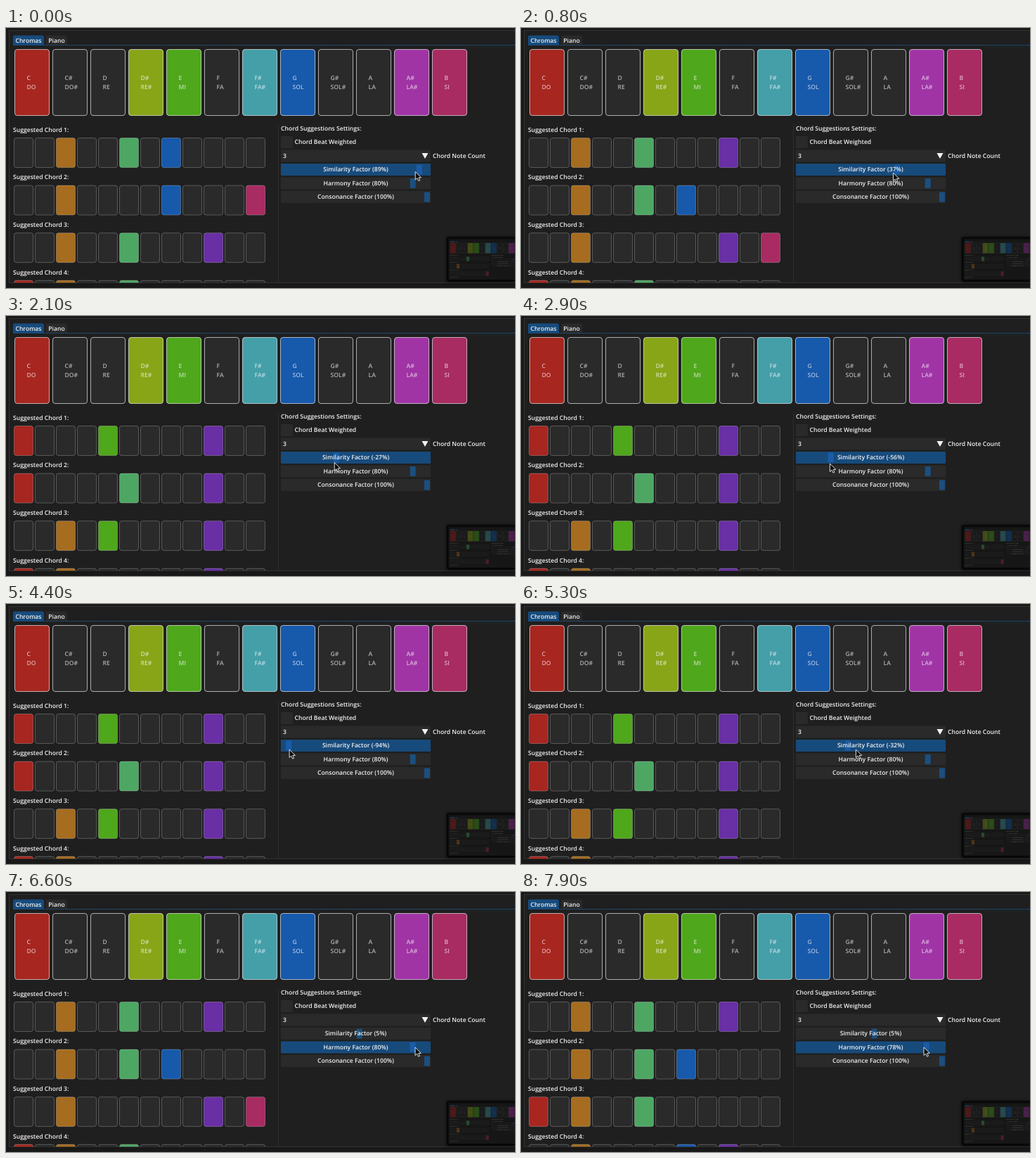
An HTML page that plays this animation: 724 px wide and 370 px high, repeating every 8 s.

```html
<!DOCTYPE html>
<html lang="en">
<head>
<meta charset="utf-8">
<title>Chord suggestions</title>
<style>
  html, body { margin: 0; width: 100%; height: 100%; overflow: hidden; background: #191919; }
  svg { display: block; width: 724px; height: 370px; }
  text {
    font: 600 8.6px "Open Sans", "Noto Sans", sans-serif;
    fill: #f2f2f2;
    text-rendering: geometricPrecision;
  }
  .note { fill: #fff; fill-opacity: .62; }
  .mid { text-anchor: middle; }
</style>
</head>
<body>
<svg id="stage" viewBox="0 0 724 370">
  <defs>
    <clipPath id="panel"><rect width="724" height="362.5"/></clipPath>
    <filter id="soft" x="-20%" y="-20%" width="140%" height="140%"><feGaussianBlur stdDeviation="2"/></filter>
  </defs>
</svg>
<script>
const LOOP = 8000, STEP = 100;
const WHITE = '#f2f2f2', DARK = '#2a2a2a', BLUE = '#174b7c', GRAB = '#1b4f80', GRAB_ON = '#1b5ca6';
const FRAME_H = 16.9, LINE_H = 19.5, SETTINGS_X = 391, SETTINGS_W = 213;

const NOTES = 'C DO,C# DO#,D RE,D# RE#,E MI,F FA,F# FA#,G SOL,G# SOL#,A LA,A# LA#,B SI'
  .split(',').map(s => s.split(' '));
const COLORS = ['#a72620', DARK, '#a66c1f', '#88a518', '#4fa71c', '#4da763',
  '#449fa8', '#1759ab', DARK, '#692fa5', '#a034a5', '#a82b62'];
const UNLIT = ['D', 'F', 'A'];

const el = (tag, attrs, parent, text) => {
  const node = document.createElementNS('http://www.w3.org/2000/svg', tag);
  for (const k in attrs) node.setAttribute(k, attrs[k]);
  if (text !== undefined) node.textContent = text;
  return parent.appendChild(node);
};
const box = (p, x, y, width, height, fill, extra) =>
  el('rect', { x, y, width, height, fill, ...extra }, p);
const path = (p, d, fill, extra) => el('path', { d, fill, ...extra }, p);
const label = (p, x, cy, text, cls = '') =>
  el('text', { x, y: cy + 3.2, class: cls }, p, text);

const midX = SETTINGS_X + SETTINGS_W / 2;
const grabX = value => midX + 1.015 * value;
const rowY = n => 154 + LINE_H * n;

function slider(p, n, name) {
  const y = rowY(n);
  const frame = box(p, SETTINGS_X, y, SETTINGS_W, FRAME_H, DARK, { rx: 1 });
  const grab = box(p, 0, y + 1.5, 8, FRAME_H - 3, GRAB, { rx: 1 });
  const text = label(p, midX, y + 8, '', 'mid');
  return (value, active) => {
    frame.setAttribute('fill', active ? BLUE : DARK);
    grab.setAttribute('fill', active ? GRAB_ON : GRAB);
    grab.setAttribute('x', grabX(value) - 4);
    text.textContent = `${name} Factor (${Math.round(value)}%)`;
  };
}

function tab(p, x, w, name, fill) {
  path(p, `M${x} 24.5V13q0-2.5 2.5-2.5h${w - 5}q2.5 0 2.5 2.5V24.5z`, fill);
  label(p, x + w / 2, 17.7, name, 'mid');
}

function buildUi(root) {
  box(root, 0, 0, 724, 370, '#191919');
  box(root, 4.5, 3.5, 730, 359, '#1f1f1f', { stroke: '#343434' });
  tab(root, 10, 44, 'Chromas', BLUE);
  tab(root, 57, 30, 'Piano', DARK);
  path(root, 'M10 24.5H724', 'none', { stroke: '#1a4670' });

  NOTES.forEach(([name, solfa], i) => {
    const x = 12.5 + 54 * i;
    box(root, x, 30.5, 49, 94, UNLIT.includes(name) ? DARK : COLORS[i],
      { rx: 3.5, stroke: '#fff', 'stroke-opacity': .62 });
    label(root, x + 17, 71, name, 'note');
    label(root, x + 17, 84, solfa, 'note');
  });

  path(root, 'M387.5 137V362', 'none', { stroke: '#2e2e2e' });

  const inner = el('g', { 'clip-path': 'url(#panel)' }, root);
  const rows = [0, 1, 2, 3].map(r => {
    const y = 67.6 * r;
    label(inner, 10, 144.5 + y, `Suggested Chord ${r + 1}:`);
    return NOTES.map((_, i) => box(inner, 11.5 + 30 * i, 156.5 + y, 27, 42, DARK,
      { rx: 3, stroke: '#fff', 'stroke-opacity': .24 }));
  });

  label(root, SETTINGS_X, 143, 'Chord Suggestions Settings:');
  box(root, SETTINGS_X, rowY(0), FRAME_H, FRAME_H, DARK, { rx: 1 });
  label(root, 410.5, rowY(0) + 8, 'Chord Beat Weighted');
  box(root, SETTINGS_X, rowY(1), SETTINGS_W, FRAME_H, DARK, { rx: 1 });
  label(root, 394, rowY(1) + 8.3, '3');
  path(root, 'M591.5 178h9l-4.5 8z', WHITE);
  label(root, 607, rowY(1) + 8.3, 'Chord Note Count');
  const sim = slider(root, 2, 'Similarity');
  const har = slider(root, 3, 'Harmony');
  slider(root, 4, 'Consonance')(100, false);

  return (chords, s, h, active) => {
    const lit = chords.split(' ').map(c => [...c].map(d => parseInt(d, 16)));
    rows.forEach((cells, r) => cells.forEach((cell, i) =>
      cell.setAttribute('fill', lit[r].includes(i) ? COLORS[i] : DARK)));
    sim(s, active === 'sim');
    har(h, active === 'har');
  };
}

const stage = document.getElementById('stage');
const drawUi = buildUi(el('g', {}, stage));

// dim preview of the whole window in the corner
box(stage, 626, 297, 110, 65, '#000', { rx: 3, opacity: .6, filter: 'url(#soft)' });
box(stage, 628, 298.5, 110, 61, '#101010', { rx: 2, stroke: '#050505', 'stroke-width': 2 });
const mini = el('g', { transform: 'translate(630 301.3) scale(.154)', opacity: .4 }, stage);
buildUi(mini)('5 2 b 0', 89, 80);

const cursor = path(stage, 'M0 0V11.5L2.7 9.1L4.6 13.2L6.5 12.3L4.7 8.4H8.3Z', '#0a0a0a',
  { stroke: '#f4f4f4', 'stroke-width': .9, 'stroke-linejoin': 'round' });

// progress from 0 to 1 between two times
const ramp = (t, a, b) => Math.min(1, Math.max(0, (t - a) / (b - a)));
const smooth = u => u * u * (3 - 2 * u);
const mix = (a, b, u) => a + (b - a) * u;

// drag strokes: each takes the slider to a value
const STROKES = [
  { from: 0, to: 1400, value: -2 },
  { from: 1400, to: 2900, value: -56 },
  { from: 2900, to: 3800, value: -76 },
  { from: 4000, to: 4400, value: -94 },
  { from: 4700, to: 5660, value: 5 }
];
const similarity = t =>
  STROKES.reduce((v, s) => mix(v, s.value, ramp(t, s.from, s.to)), 89);

// each hex digit is a chroma; the list follows from the slider values
function suggest(s, h) {
  if (s > 45) return '257 27b 259 025';
  if (s > 1.5) return h > 79 ? '259 257 29b 025' : '259 257 025 279';
  return s > -25 ? '259 059 249 029' : '049 059 249 029';
}

function frame(now) {
  const t = Math.floor(now % LOOP / STEP) * STEP;
  const s = similarity(t);
  const pull = ramp(t, 6700, 7800);
  const h = 80 - 2 * pull;
  const glide = smooth(ramp(t, 5800, 6500));

  drawUi(suggest(s, h), s, h, glide < .2 ? 'sim' : glide > .5 ? 'har' : '');

  // the slider trails the pointer by one step
  const x = mix(grabX(similarity(t + STEP)) + 1, 582 - 9 * pull, glide);
  const sag = mix(204.5, 210, ramp(t, 0, 2900)) - 3 * ramp(t, 2900, 4400);
  cursor.setAttribute('transform', `translate(${x} ${mix(sag, 221, glide)})`);
  requestAnimationFrame(frame);
}
requestAnimationFrame(frame);
</script>
</body>
</html>
```
